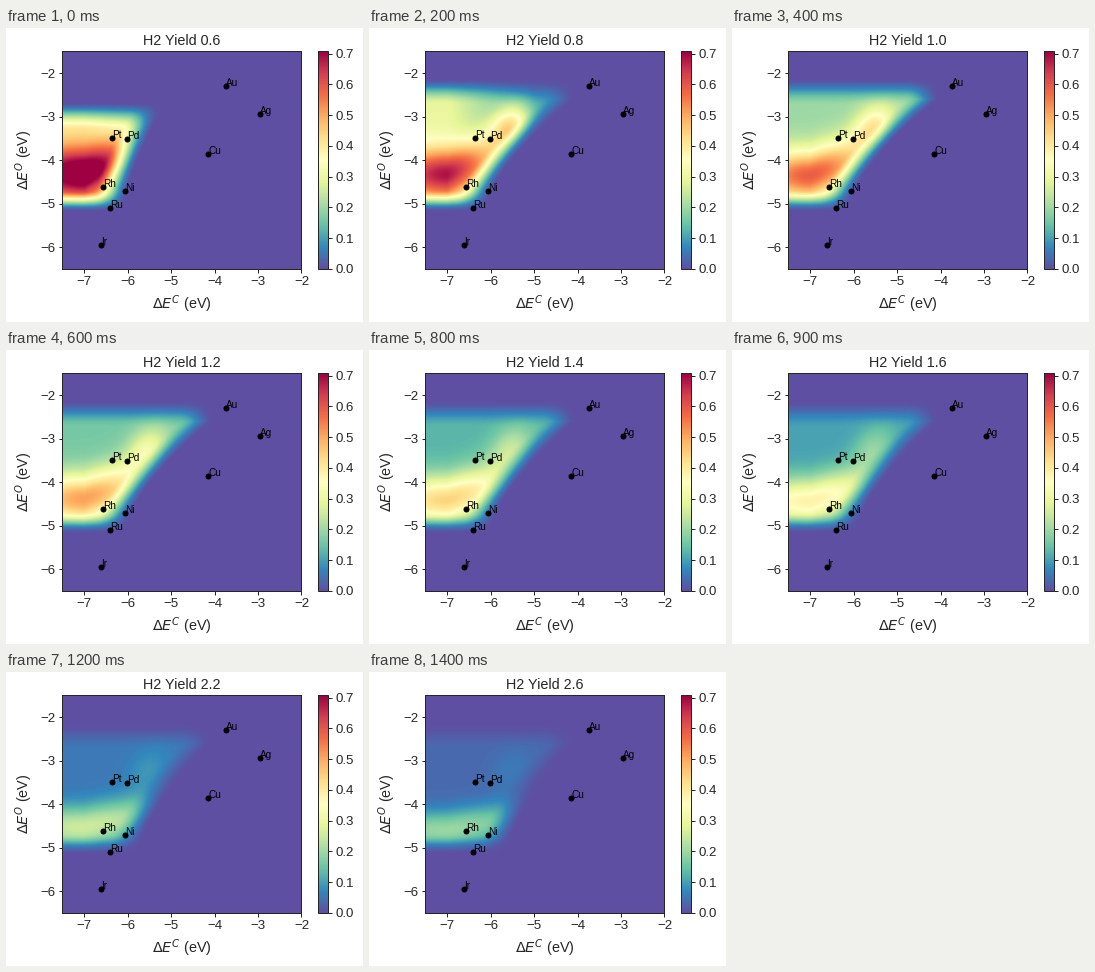
Animation, 357 px wide and 294 px high, one loop 1.9 s. Source, as a matplotlib script:

```python
import numpy as np
import matplotlib.pyplot as plt
from matplotlib.animation import FuncAnimation

W, H, DPI = 357, 294, 72
INK = "0.15"
VMAX = 0.707
XLIM, YLIM = (-7.5, -2), (-6.5, -1.5)

plt.rcParams.update({
    "font.family": "Liberation Sans",
    "text.color": INK, "axes.labelcolor": INK, "axes.edgecolor": INK,
    "xtick.color": INK, "ytick.color": INK,
    "axes.linewidth": 1.0,
    "axes.titlesize": 14.4, "axes.labelsize": 14.4,
    "xtick.labelsize": 13.2, "ytick.labelsize": 13.2,
    "xtick.major.width": 1.0, "ytick.major.width": 1.0,
})

METALS = {
    "Au": (-3.745, -2.29), "Ag": (-2.95, -2.94), "Cu": (-4.145, -3.85),
    "Pt": (-6.36, -3.49), "Pd": (-6.01, -3.505), "Rh": (-6.56, -4.62),
    "Ni": (-6.06, -4.70), "Ru": (-6.40, -5.10), "Ir": (-6.61, -5.945),
}

X, Y = np.meshgrid(np.linspace(*XLIM, 240), np.linspace(*YLIM, 218))


def ramp(t):
    t = np.clip(t, 0, 1)
    return t * t * (3 - 2 * t)


def bump(t):
    return np.exp(-t * t)


def early(level, start, middle, end):
    """Key values while the yield rises from 0.6 through 0.8 to 1.0."""
    return np.interp(level, [0.6, 0.8, 1.0], [start, middle, end])


def yield_at(step):
    return 0.6 + 0.1 * step if step <= 8 else 1.4 + 0.2 * (step - 8)


def field(level):
    over = max(level - 1, 0)
    under = max(1 - level, 0)

    # Broad shelf that tilts down to the right at low yield.
    tilt = early(level, 0.45, 0.7, 0) * np.clip((X + 7) / 2, 0, 1)
    shelf = (0.28 + 0.7 * under) * np.exp(-1.1 * over) * (1 - tilt)

    # Hot core drawn out into a tongue that slants upwards.
    spine = -4.3 - 0.15 * (level - 0.6) + (0.35 - 0.12 * over) * (X + 7).clip(0)
    core = (0.55 * np.exp(-0.55 * over) * bump((Y - spine) / (0.6 - 0.1 * over))
            * bump((X + 7) / (1.4 + 0.6 * over)))

    # Second summit on the upper right.
    lean = X + 5.55 - 0.3 * (Y + 3.2)
    summit = (early(level, 0, 0.35, 0.25) * np.exp(-1.35 * over)
              * bump(lean / 0.45) * bump((Y + 3.2) / 0.5))

    # Soft limits at the top, at the bottom and along the curved right side.
    top = early(level, -2.65, -2.1, -2.1)
    foot = -6 + 0.32 * over
    head = early(level, -5, -4, -4)
    rise = np.clip((Y + 5) / 2.4, 0, 1) ** 1.5
    side = foot + (head - foot) * rise
    mask = ramp((top - Y) / 0.65) * ramp((Y + 5.2) / 0.5) * ramp((side - X) / 0.8)

    return VMAX * mask * (shelf + core + summit)


def px_axes(left, bottom, width, height):
    return fig.add_axes([left / W, bottom / H, width / W, height / H])


fig = plt.figure(figsize=(W / DPI, H / DPI), dpi=DPI, facecolor="white")
ax = px_axes(56.3, 53.2, 239.18, 217.44)
cax = px_axes(311.6, 53.2, 10.87, 217.44)

image = ax.imshow(field(0.6), cmap="Spectral_r", vmin=0, vmax=VMAX,
                  aspect="auto", origin="lower", interpolation="bilinear",
                  extent=(*XLIM, *YLIM))
ax.set(xticks=range(-7, -1), yticks=range(-6, -1))
ax.set_xlabel(r"$\Delta E^{C}$ (eV)", labelpad=6)
ax.set_ylabel(r"$\Delta E^{O}$ (eV)", labelpad=5)

for name, (x, y) in METALS.items():
    ax.plot(x, y, "o", color="black", markersize=5)
    ax.text(x, y, name, color="black", fontsize=10)

fig.colorbar(image, cax=cax, ticks=np.arange(8) / 10)
title = ax.set_title("")


def update(frame):
    level = yield_at(min(frame, 14))
    image.set_data(field(level))
    title.set_text(f"H2 Yield {level:.1f}")
    return image, title


anim = FuncAnimation(fig, update, frames=19, interval=100, repeat=True,
                     repeat_delay=0)
plt.show()
```
